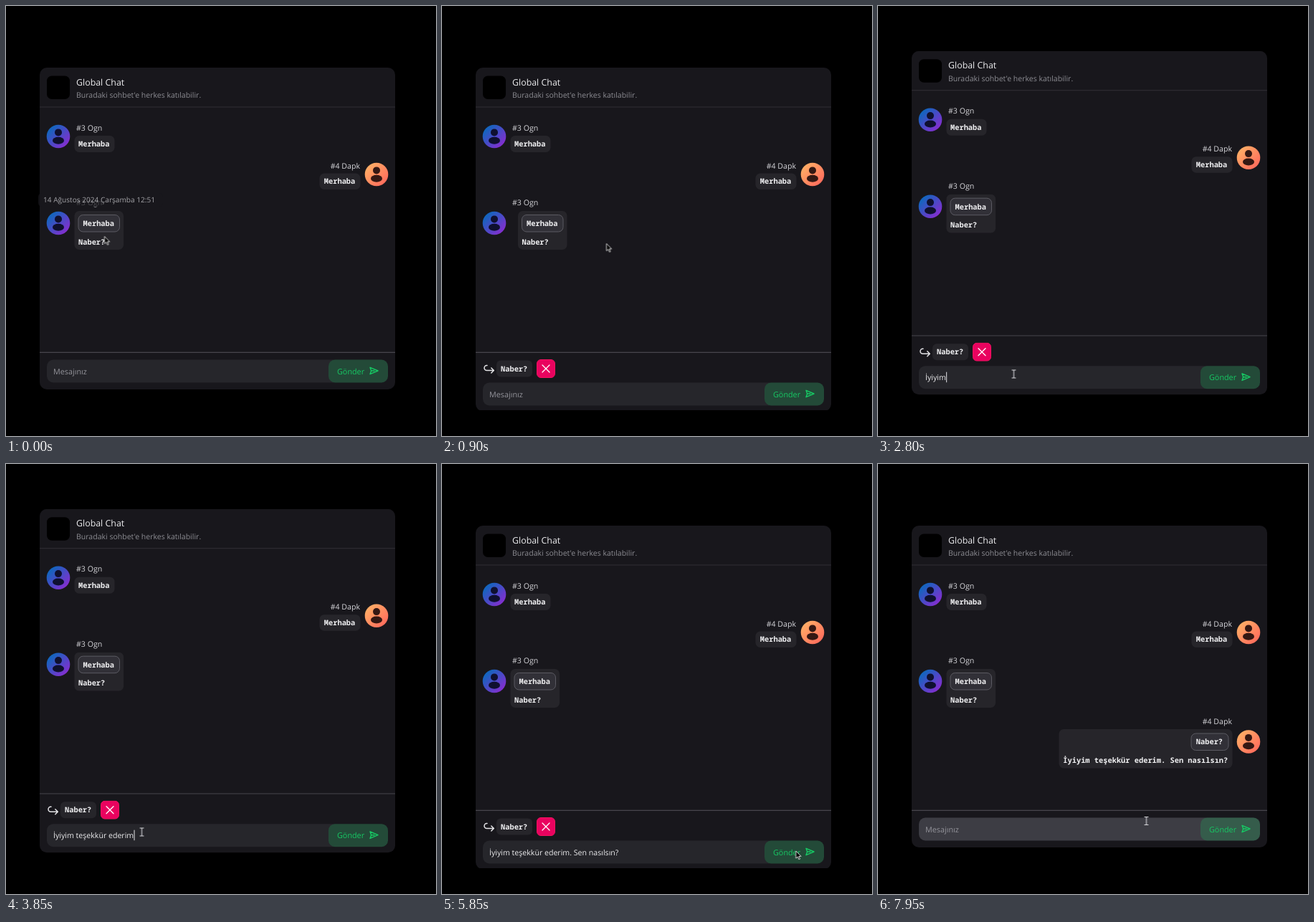
Recreate the animation shown at these times as an HTML page. Size 600 by 600 pixels, loop 8 s.

```html
<!DOCTYPE html>
<html lang="tr">
<head>
<meta charset="utf-8">
<title>Sohbet</title>
<style>
html, body { margin: 0; width: 100%; height: 100%; overflow: hidden; background: #000; }
svg { display: block; width: 100vw; height: 100vh; }
text { font: 10.6px "Open Sans", "Noto Sans", sans-serif; fill: #d6d6da; white-space: pre; text-rendering: geometricPrecision; }
.title { font-size: 12.4px; fill: #ececee; }
.sub { font-size: 10.52px; fill: #8c8c92; }
.hint { font-size: 10.8px; fill: #94949b; }
.mono { font: 700 10.36px "Noto Sans Mono", "DejaVu Sans Mono", monospace; fill: #f0f0f2; }
.send { font-size: 10.8px; font-weight: 500; fill: #17c964; }
.bubble { fill: #26252a; }
.quote { fill: #313037; stroke: #5b5a62; }
.line { fill: none; stroke-linecap: round; stroke-linejoin: round; }

#scene, #panel, #drag, #tip, #answer, #reply, #footer, #field, #cursor, #arrow, #beam {
  animation: 8s linear infinite;
}
#scene { animation-name: pan; }
#panel { animation-name: grow; }
#drag { animation-name: drag; }
#tip { animation-name: tip; }
#answer { animation-name: answer; }
#reply { animation-name: reply; }
#footer { animation-name: lower; }
#field { animation-name: hover; }
#cursor { animation-name: travel; }
#arrow { animation-name: arrow; animation-timing-function: step-end; }
#beam { animation-name: beam; animation-timing-function: step-end; }

@keyframes pan {
  0%, 25% { transform: none; animation-timing-function: ease-in-out; }
  29.5%, 65% { transform: translateY(-23.3px); animation-timing-function: ease-in-out; }
  70%, 100% { transform: none; }
}
@keyframes grow {
  0%, 5.5% { height: 449px; animation-timing-function: ease-out; }
  9.5%, 74% { height: 479.5px; animation-timing-function: ease-in-out; }
  78%, 100% { height: 449px; }
}
@keyframes lower {
  0%, 5.5% { transform: none; animation-timing-function: ease-out; }
  9.5%, 74% { transform: translateY(32px); animation-timing-function: ease-in-out; }
  78%, 100% { transform: none; }
}
@keyframes reply {
  0%, 5.5% { opacity: 0; }
  9.5%, 74% { opacity: 1; }
  77%, 100% { opacity: 0; }
}
@keyframes drag {
  0%, 1.5% { transform: none; animation-timing-function: ease-in-out; }
  10%, 12% { transform: translateX(10.5px); animation-timing-function: ease-out; }
  15.5%, 100% { transform: none; }
}
@keyframes tip {
  0% { opacity: .74; }
  2.5%, 100% { opacity: 0; }
}
@keyframes answer {
  0%, 74.2% { opacity: 0; }
  78.5%, 100% { opacity: 1; }
}
@keyframes hover {
  0%, 18.8% { fill: #26262b; }
  20.5%, 23% { fill: #3d3d44; }
  25.5%, 88% { fill: #26262b; }
  90%, 100% { fill: #3d3d44; }
}
@keyframes travel {
  0%, 1.5% { transform: translate(137.5px, 321.5px); animation-timing-function: ease-in-out; }
  10%, 12.5% { transform: translate(229.5px, 331.5px); animation-timing-function: ease-in-out; }
  20.5%, 64% { transform: translate(189.5px, 536.8px); animation-timing-function: ease-in-out; }
  73%, 84.5% { transform: translate(493.8px, 540px); animation-timing-function: ease-in-out; }
  91.5%, 93.5% { transform: translate(402px, 513px); animation-timing-function: ease-out; }
  99.3%, 100% { transform: translate(374.5px, 498px); }
}
@keyframes arrow {
  0% { opacity: 1; }
  18.8% { opacity: 0; }
  70% { opacity: 1; }
  88%, 100% { opacity: 0; }
}
@keyframes beam {
  0% { opacity: 0; }
  18.8% { opacity: 1; }
  70% { opacity: 0; }
  88%, 100% { opacity: 1; }
}
</style>
</head>
<body>
<svg viewBox="0 0 600 600">
  <defs>
    <linearGradient id="cool" x1=".1" y1=".1" x2=".9" y2=".9">
      <stop offset=".1" stop-color="#1464be"/><stop offset="1" stop-color="#8a2bd0"/>
    </linearGradient>
    <linearGradient id="warm" x1=".1" y1=".1" x2=".9" y2=".9">
      <stop offset="0" stop-color="#ffb066"/><stop offset="1" stop-color="#ff6a5c"/>
    </linearGradient>
    <clipPath id="page"><rect width="600" height="563.5"/></clipPath>
  </defs>
  <g clip-path="url(#page)">
    <g id="scene">
      <rect id="panel" x="47" y="86" width="496" height="449" rx="10" fill="#18171c"/>
      <rect x="57" y="97.5" width="32" height="32.5" rx="7"/>
      <text class="title" x="98" y="110.5">Global Chat</text>
      <text class="sub" x="98" y="128">Buradaki sohbet'e herkes katılabilir.</text>
      <path d="M47 141H543" stroke="#302f35"/>
      <path d="M47 483.3H543" stroke="#47464d" stroke-width="1.2"/>
      <g id="chat"></g>
      <g id="tip">
        <rect x="45" y="261" width="174" height="19" rx="5" fill="#18171c"/>
        <text x="52" y="273.7" style="font-size:10.1px">14 Ağustos 2024 Çarşamba 12:51</text>
      </g>
      <g id="reply">
        <path class="line" d="M63 501.5H62.5A3 3 0 0 0 62.5 508.5H72M68.8 505L72.3 508.5L68.8 512" stroke="#e4e4e7" stroke-width="1.5"/>
        <rect class="bubble" x="76" y="494.5" width="50" height="23" rx="6"/>
        <text class="mono" x="82" y="509.5">Naber?</text>
        <rect x="132.5" y="493.5" width="25" height="25" rx="5.5" fill="#e9035f" stroke="#f31260"/>
        <path class="line" d="M140 501L150 511M150 501L140 511" stroke="#fff" stroke-width="1.3"/>
      </g>
      <g id="footer">
        <rect id="field" x="57" y="493.5" width="476" height="32" rx="9" fill="#26262b"/>
        <text id="hint" class="hint" x="66" y="513.8">Mesajınız</text>
        <text id="typed" x="66" y="513.8" style="fill:#ececee"></text>
        <rect id="caret" y="502" width="1" height="14.5" fill="#e4e4e7"/>
        <rect x="450" y="493.5" width="83" height="32" rx="9" fill="#17c964" fill-opacity=".22"/>
        <text class="send" x="462" y="513.5">Gönder</text>
        <path class="line" d="M508 504.3L519 509L508 513.7L509.6 509ZM509.6 509H514" stroke="#17c964" stroke-width="1.4"/>
      </g>
    </g>
  </g>
  <g style="animation:pan 8s linear infinite">
    <g id="cursor">
      <path id="arrow" d="M0 0V10.2L2.4 8L4.1 11.8L5.7 11.1L4 7.4H7.2Z" fill="#000" stroke="#e8e8e8" stroke-width=".9"/>
      <path id="beam" class="line" d="M-2.5 -5.5H-.7L0 -5L.7 -5.5H2.5M0 -5V5M-2.5 5.5H-.7L0 5L.7 5.5H2.5" stroke="#d8d8dc" stroke-width="1.1"/>
    </g>
  </g>
</svg>
<script>
const byId = id => document.getElementById(id);
const message = 'İyiyim teşekkür ederim. Sen nasılsın?';

const mono = (x, y, s) => `<text class="mono" x="${x}" y="${y}">${s}</text>`;
const box = (cls, x, y, w, h) => `<rect class="${cls}" x="${x}" y="${y}" width="${w}" height="${h}" rx="6.5"/>`;
const avatar = (x, y, paint, ink) => `<g transform="translate(${x} ${y})">
  <circle r="16.3" fill="url(#${paint})"/>
  <g fill="${ink}"><circle cy="-5.6" r="5"/><ellipse cy="5.8" rx="8" ry="5"/></g></g>`;
const left = y => avatar(73, y, 'cool', '#0f1030') + `<text x="98" y="${y - 8.5}">#3 Ogn</text>`;
const right = y => avatar(517, y, 'warm', '#341813') + `<text x="494" y="${y - 8.5}" text-anchor="end">#4 Dapk</text>`;

byId('chat').innerHTML =
  left(182) + box('bubble', 95.5, 181, 56, 23) + mono(101, 196, 'Merhaba') +
  right(235) + box('bubble', 437.5, 233.5, 57, 22.5) + mono(443.8, 248.3, 'Merhaba') +
  avatar(73, 303, 'cool', '#0f1030') + '<text x="98" y="278">#3 Ogn</text>' +
  '<g id="drag">' + box('bubble', 95.5, 286, 68.5, 54) + box('quote', 101, 291.5, 57.5, 23.5) +
  mono(107.5, 307, 'Merhaba') + mono(101, 332.5, 'Naber?') + '</g>' +
  '<g id="answer">' + avatar(517, 387.5, 'warm', '#341813') +
  '<text x="494" y="362.5" text-anchor="end">#4 Dapk</text>' +
  box('bubble', 252.5, 370, 242, 54.5) + box('quote', 437, 376, 52, 23.5) +
  mono(443.8, 391.3, 'Naber?') + mono(258.3, 416.7, message) + '</g>';

// [time in ms, letters typed so far]
const typing = [[2050, 0], [2450, 6], [2800, 6], [3450, 18], [4300, 28], [4850, message.length]];

function lettersAt(t) {
  if (t < typing[0][0] || t >= 5920) return 0;
  const next = typing.findIndex(([time]) => time > t);
  if (next < 0) return message.length;
  const [t0, n0] = typing[next - 1], [t1, n1] = typing[next];
  return Math.floor(n0 + (n1 - n0) * (t - t0) / (t1 - t0));
}

const typed = byId('typed'), hint = byId('hint'), caret = byId('caret');
const start = performance.now();

function draw() {
  const t = (performance.now() - start) % 8000;
  const n = lettersAt(t);
  typed.textContent = message.slice(0, n);
  hint.style.opacity = n ? 0 : 1;
  caret.style.opacity = t >= 1750 && t < 5050 ? 1 : 0;
  caret.setAttribute('x', 66.3 + (n ? typed.getComputedTextLength() : 0));
  requestAnimationFrame(draw);
}
draw();
</script>
</body>
</html>
```
